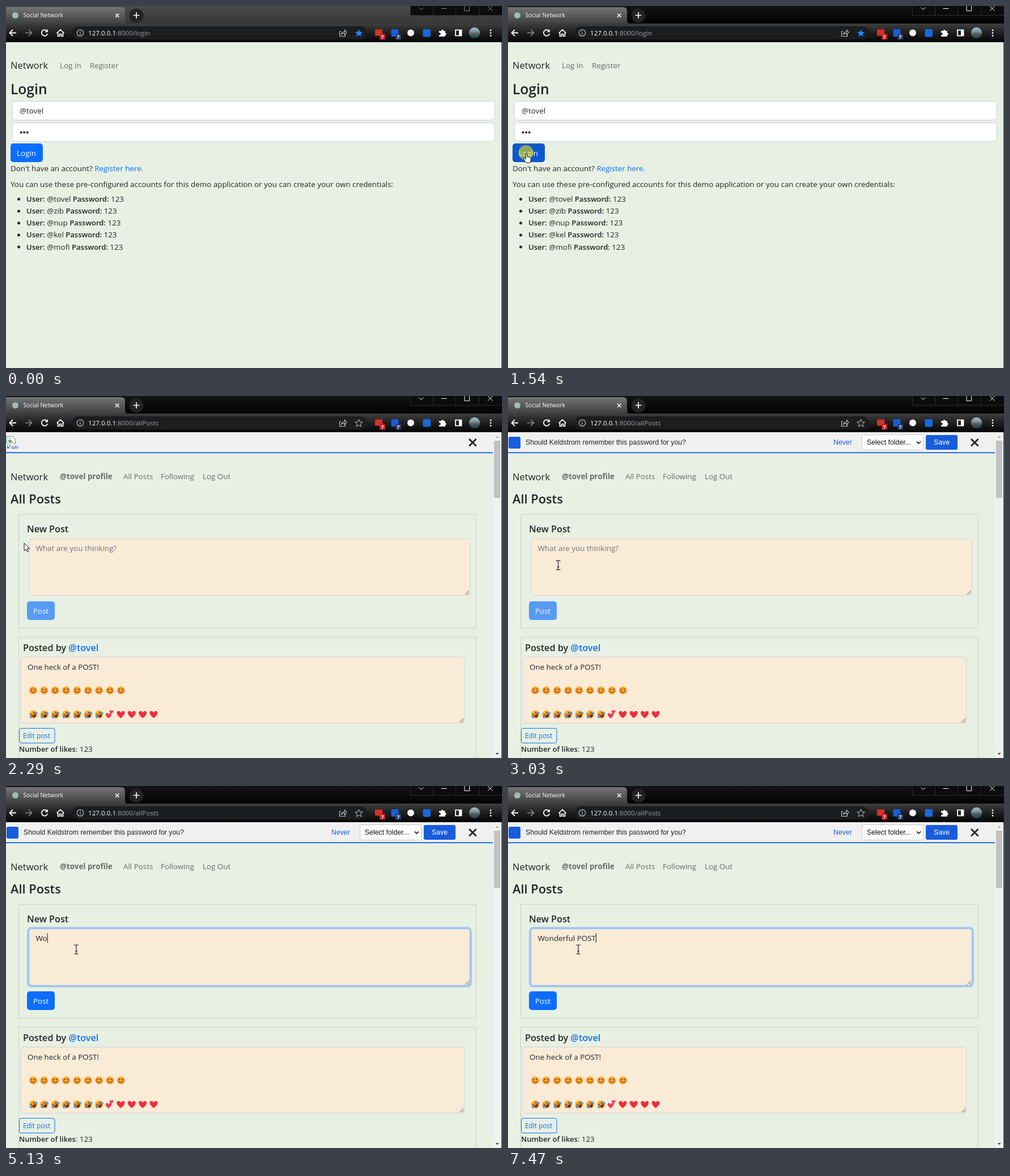
Recreate the animation shown at these times as an HTML page. Size 875 by 640 pixels, loop 8 s.

```html
<!DOCTYPE html>
<html lang="en">
<head>
<meta charset="utf-8">
<title>Social Network</title>
<style>
  html, body { margin: 0; width: 100%; height: 100%; overflow: hidden; background: #e7f0e2; }
  svg { display: block; width: 875px; height: 640px; }
  text { font-family: "Open Sans", "Noto Sans", sans-serif; white-space: pre; }
  .arial { font-family: "Liberation Sans", Arial, sans-serif; }
  .bold { font-weight: 700; }
  .semi { font-weight: 600; }
</style>
</head>
<body>
<svg id="stage" viewBox="0 0 875 640"></svg>
<script>
const LOOP = 8000;
const BLUE = '#0d6efd', INK = '#212529', BAR_BLUE = '#175ddc', MUTED = '#686c66';
const BODY = 13.38, STRONG = 13;
const USER = '@tovel';

const text = (x, y, size, content, fill = INK, cls = '') =>
  `<text x="${x}" y="${y}" font-size="${size}" fill="${fill}" class="${cls}">${content}</text>`;
const rect = (x, y, w, h, fill, r = 0, more = '') =>
  `<rect x="${x}" y="${y}" width="${w}" height="${h}" rx="${r}" fill="${fill}" ${more}/>`;
const circle = (x, y, r, fill, more = '') =>
  `<circle cx="${x}" cy="${y}" r="${r}" fill="${fill}" ${more}/>`;
const line = (d, color, width = 1, more = '') =>
  `<path d="${d}" fill="none" stroke="${color}" stroke-width="${width}" ${more}/>`;
const group = (id, content, more = '') => `<g id="${id}" ${more}>${content}</g>`;
const strong = s => `<tspan class="semi" font-size="${STRONG}">${s}</tspan>`;
const blue = s => `<tspan fill="${BLUE}">${s}</tspan>`;
const many = (n, make) => Array.from({ length: n }, (_, i) => make(i)).join('');
const field = (x, y, w, h, fill, more = '') => rect(x, y, w, h, fill, 5, `stroke="#ced4da" ${more}`);
const grip = (x, y) => line(`M${x - 7} ${y}l7 -7M${x - 3} ${y}l3 -3`, '#555', 1);

const gradient = (id, ...stops) =>
  `<linearGradient id="${id}" x2="0" y2="1">${stops.map(([at, c]) =>
    `<stop offset="${at}" stop-color="${c}"/>`).join('')}</linearGradient>`;

const defs = `<defs>
  ${gradient('idleStrip', [0, '#4b4b4b'], [1, '#363636'])}
  ${gradient('activeStrip', [0, '#141414'], [1, '#020202'])}
  ${gradient('tabFill', [0, '#757575'], [1, '#3d3d3d'])}
  ${gradient('toolFill', [0, '#3e3e3e'], [.55, '#1c1c1c'], [1, '#050505'])}
  ${gradient('photo', [0, '#a9bfca'], [.4, '#7692a2'], [.5, '#806b50'], [.65, '#39606c'], [1, '#24414b'])}
  <clipPath id="altClip"><rect x="1" y="86" width="21" height="7"/></clipPath>
</defs>`;

// Login page
const accounts = [USER, '@zib', '@nup', '@kel', '@mofi'];
const loginPage = group('login',
  text(8, 111, 16.6, 'Network') +
  text(95, 110, BODY, 'Log In', MUTED) + text(148, 110, BODY, 'Register', MUTED) +
  text(8, 155.5, 24.6, 'Login', INK, 'semi') +
  field(11.5, 168.5, 850.5, 33, '#fff') + text(24, 190, BODY, USER) +
  field(11.5, 206.5, 850.5, 33, '#fff') + many(3, i => circle(26.5 + 5.6 * i, 223.5, 2, INK)) +
  rect(8, 243, 57, 33, BLUE, 5, 'id="loginButton"') + text(19, 265, BODY, 'Login', '#fff') +
  text(8, 292, BODY, `Don't have an account? ${blue('Register here.')}`) +
  text(8, 319.5, BODY, 'You can use these pre-configured accounts for this demo application or you can create your own credentials:') +
  accounts.map((name, i) => {
    const y = 346 + 21.15 * i;
    return circle(22.5, y - 4.5, 2.5, INK) +
      text(36, y, BODY, `${strong('User:')} ${name} ${strong('Password:')} 123`);
  }).join(''));

// Emoji
const face = '<circle r="7" fill="#fbab2c"/>';
const smile = (x, y) => `<g transform="translate(${x} ${y})">${face}` +
  circle(-4.2, 1.2, 1.7, '#f2654a') + circle(4.2, 1.2, 1.7, '#f2654a') +
  line('M-4.3 -1.3q1.5 -2.6 3 0M1.3 -1.3q1.5 -2.6 3 0M-3.4 2q3.4 4 6.8 0', '#5d341c', 1.1) + '</g>';
const rofl = (x, y) => `<g transform="translate(${x} ${y}) rotate(-35)">${face}` +
  '<path d="M-4 1h8q-.6 5 -4 5t-4 -5z" fill="#7a2d22"/>' +
  line('M-4.2 -3l2.7 1.4l-2.7 1.2M4.2 -3l-2.7 1.4l2.7 1.2', '#5d341c', 1) +
  '<ellipse cx="-5.8" cy="1.2" rx="2" ry="2.3" fill="#3d9ee8"/><ellipse cx="5.8" cy="1.2" rx="2" ry="2.3" fill="#3d9ee8"/></g>';
const heart = (x, y, s = 1, color = '#ee2f3c') =>
  `<path transform="translate(${x} ${y}) scale(${s})" fill="${color}" d="M0 6.5C-9 0 -8 -6 -4 -6Q-1 -6 0 -3Q1 -6 4 -6C8 -6 9 0 0 6.5z"/>`;

// Feed page
const feedPage = group('feed',
  text(8, 148.5, 16.6, 'Network') +
  text(95, 147, BODY, `${USER} profile`, MUTED, 'bold') + text(207, 147, BODY, 'All Posts', MUTED) +
  text(273, 147, BODY, 'Following', MUTED) + text(347, 147, BODY, 'Log Out', MUTED) +
  text(8, 190, 21.8, 'All Posts', INK, 'semi') +
  rect(22.5, 209.5, 806.5, 201, 'none', 0, 'stroke="#cbd3c7"') +
  text(37, 241, 16.2, 'New Post', INK, 'semi') +
  rect(38.7, 250.7, 781.6, 103.6, 'none', 6.5, 'id="glow" stroke="#a9cbf0" stroke-width="3.6"') +
  field(40.5, 252.5, 778, 100, '#faebd7', 'id="composer"') + grip(817, 351) +
  text(52.5, 274, BODY, '', INK, 'draft') +
  line('M0 260V277', '#111', 1, 'id="caret"') +
  group('postButton', rect(37, 363, 49, 33, BLUE, 5) + text(48, 385, BODY, 'Post', '#fff')) +
  rect(22.5, 426.5, 806.5, 230, 'none', 0, 'stroke="#cbd3c7"') +
  text(30, 451, 16.2, `Posted by ${blue(USER)}`, INK, 'semi') +
  field(26.5, 461.5, 782, 117, '#faebd7') + grip(807, 577) +
  text(38, 483.5, BODY, 'One heck of a POST!') +
  many(9, i => smile(48 + 19.35 * i, 520.5)) + many(7, i => rofl(48 + 19.35 * i, 563)) +
  heart(181, 565, .75, '#ef3d55') + heart(186, 558.5, .5, '#ef3d55') +
  many(4, i => heart(202.5 + 19.35 * i, 563)) +
  rect(23.5, 587.5, 62.5, 26, 'none', 3.5, `stroke="${BLUE}"`) + text(30, 605, 11.8, 'Edit post', BLUE) +
  text(23, 629, BODY, `${strong('Number of likes')}: 123`) +
  rect(859, 64, 15, 576, '#f1f1f1') + rect(861, 79, 11, 101, '#c1c1c1') +
  '<path d="M863.5 74l3 -3.5l3 3.5z" fill="#b9a5a5"/><path d="M863.5 631l3 3.5l3 -3.5z" fill="#505050"/>');

// Password bar
const bar = group('bar',
  rect(0, 64, 875, 36, '#f0f0f0', 0, 'class="barFill"') + rect(0, 99.3, 875, 1.8, BAR_BLUE, 0, 'class="barFill"') +
  group('barText',
    rect(1, 72, 21, 21, BAR_BLUE, 3) +
    text(31, 86, 12.3, 'Should Keldstrom remember this password for you?', '#222', 'arial') +
    group('barButtons',
      text(589, 86, 12.3, 'Never', BAR_BLUE, 'arial') +
      rect(639.5, 68.5, 108, 27, '#fff', 2, 'stroke="#ccc"') + text(648, 86, 12.3, 'Select folder...', '#111', 'arial') +
      line('M736 80.5l3.5 3.5l3.5 -3.5', '#111', 1.7) +
      rect(752, 69, 56, 26, BAR_BLUE, 3) + text(766, 86, 12.3, 'Save', '#fff', 'arial'))) +
  group('barBroken',
    '<path d="M1.5 71.5h10l5 5v8l-5 -3l-5 4l-5 -2z" fill="#fff" stroke="#888"/>' +
    '<path d="M3 80q4 -5 8 0l-4 3z" fill="#57a845"/>' + circle(6, 75.5, 2, '#a8c8f0') +
    `<g clip-path="url(#altClip)">${text(1, 96, 12.3, 'Keld', BAR_BLUE, 'arial')}</g>`) +
  line('M832 76l12.5 12.5M844.5 76l-12.5 12.5', '#2a2a2a', 3, 'id="barClose"'));

// Browser frame
const badge = (x, fill) => rect(x - 5, 49, 10, 10.5, fill, 2) + text(x - 2.4, 57.5, 8.5, '7', '#fff', 'bold');
const STAR = 'M622.5 41.2l1.9 4.5l4.9 .4l-3.7 3.2l1.1 4.8l-4.2 -2.6l-4.2 2.6l1.1 -4.8l-3.7 -3.2l4.9 -.4z';
const chrome =
  rect(0, 0, 875, 32, 'url(#idleStrip)', 0, 'id="strip"') +
  '<path d="M0 32V2H203Q210 2 210 9V25Q210 32 217 32z" fill="url(#tabFill)"/>' +
  group('favicon', circle(16.5, 16.5, 5.5, '#9dbdbb')) +
  line('M12 20a5.5 5.5 0 0 1 0 -8', '#4b3c78', 2, 'id="spinner"') +
  text(30.5, 20, 10.15, '', '#fff', 'tabTitle') +
  line('M193 13.5l6.5 6.5M199.5 13.5l-6.5 6.5', '#fff', 1.5) +
  circle(230, 17, 12.5, '#232323') + line('M224.5 16.5h11M230 11v11', '#fff', 1.7) +
  rect(713, 0, 162, 17, '#0c0c0c') + line('M713.5 0V16.5H875M753.5 0v16.5M793.5 0v16.5M834.5 0v16.5', '#2c2c2c') +
  group('controls', line('M728.5 2.5l4 4l4 -4M767.5 4.5h10M809 0V8.5H817.5V0M850 0l8.5 8.5M858.5 0l-8.5 8.5', 'currentColor')) +
  rect(0, 31, 875, 33, 'url(#toolFill)') + rect(117, 36, 520, 23, '#1c1d1f', 11.5) +
  line('M18 47.5H7M12 42l-5.5 5.5l5.5 5.5', '#fff', 1.8) + line('M34 47.5H45M40 42l5.5 5.5l-5.5 5.5', '#8b8b8b', 1.6) +
  group('reload', line('M72.3 44.2A5.3 5.3 0 1 0 73.2 49', '#fff', 1.8) + '<path d="M73.8 41v5.3h-5.3z" fill="#fff"/>') +
  line('M63.5 43l9 9M72.5 43l-9 9', '#fff', 1.7, 'id="stop"') +
  line('M89.5 48l6.5 -6l6.5 6M91.5 47v6.5h3v-4h3v4h3v-6.5', '#fff', 1.7) +
  circle(131, 47.5, 5.7, 'none', 'stroke="#b9bcc0" stroke-width="1.2"') + line('M131 46.7v4M131 44v1.4', '#b9bcc0', 1.3) +
  text(145, 52, 11.6, '<tspan fill="#fff">127.0.0.1</tspan>:8000/<tspan id="path"></tspan>', '#9aa0a6') +
  line('M591 45h-2.5v8.5h10v-3M591.5 50q1 -4.5 6 -4.5v-3l3.5 4l-3.5 4v-2.5q-4 0 -6 2z', '#c4c7ca', 1.1) +
  `<path id="star" d="${STAR}"/>` +
  rect(651, 41.5, 13, 11, '#d93025', 1) + badge(664, '#cc1f2d') +
  rect(679.5, 41, 13, 13, BAR_BLUE, 2) + group('vaultBadge', badge(692, '#28406b')) +
  circle(714, 47.5, 6, '#f2f2f2') + rect(735.5, 41, 13.5, 13.5, '#1769e0', 2) +
  '<path d="M764 44h3.7a2 2 0 1 1 4 0h3v3.5a2 2 0 1 1 0 4v2.5h-10.7v-3a2 2 0 1 0 0 -3.6z" fill="#fff"/>' +
  rect(793, 42.5, 10.5, 10, 'none', 0, 'stroke="#fff" stroke-width="1.8"') + rect(799, 42, 5, 11, '#fff') +
  circle(826.5, 47.5, 9.7, 'url(#photo)') + many(3, i => circle(855, 43 + 4.7 * i, 1.4, '#fff')) +
  rect(874, 64, 1, 576, '#333');

// Each pointer has its hot spot at the origin.
const pointers =
  circle(0, 0, 13, '#ffee00', 'id="click" opacity=".55"') +
  group('pointer',
    '<path id="arrow" d="M0 0V13.5L3.2 10.6L5.3 15.3L7.6 14.3L5.5 9.7H9.7z" fill="#fff" stroke="#111"/>' +
    '<path id="hand" d="M-1.3 1q1.3 -2 2.6 0V7l1.8 -.5l1.7 .8l1.6 .2l1.3 1.2V13l-1.6 4H-1L-5.5 10.5q0 -2.2 2 -1.2l2.2 1.7z" fill="#fff" stroke="#111"/>' +
    line('M-4 -8H-1L0 -7L1 -8H4M0 -7V7M-4 8H-1L0 7L1 8H4M-2 3H2', '#222', 1.2, 'id="beam"'));

const stage = document.getElementById('stage');
stage.innerHTML = defs + rect(0, 0, 875, 640, '#e7f0e2') + loginPage + feedPage + bar + chrome + pointers;

const $ = id => document.getElementById(id);
const draft = stage.querySelector('.draft'), tabTitle = stage.querySelector('.tabTitle');
const barFills = stage.querySelectorAll('.barFill');
const show = (id, on) => $(id).style.display = on ? '' : 'none';
const set = (id, name, value) => $(id).setAttribute(name, value);
const shift = (id, x, y) => set(id, 'transform', `translate(${x} ${y})`);
const during = (t, from, to) => t >= from && t < to;
const ramp = (t, from, to) => Math.min(1, Math.max(0, (t - from) / (to - from)));
const mix = (a, b, k) => a + (b - a) * k;

const message = 'Wonderful POST';
const keyTimes = [4930, 5130, 5330, 5400, 5600, 5730, 5990, 6190, 6390, 6590, 6850, 7050, 7250, 7470];

// time, x, y, shape; an empty shape hides the pointer
const route = [
  [0, 0, 0, ''], [400, 692, 583, 'arrow'], [530, 150, 284, 'arrow'], [590, 0, 262, ''],
  [920, 1, 262, 'arrow'], [1000, 12, 261, 'hand'], [1270, 33, 260, 'hand'], [2010, 32, 260, 'arrow'],
  [2360, 32, 260, 'arrow'], [2430, 42, 267, 'beam'], [2690, 43, 267, 'beam'], [2900, 68, 290, 'beam'],
  [3130, 104, 306, 'beam'], [3270, 120, 301, 'beam'], [3440, 124, 289, 'beam'], [LOOP, 124, 289, 'beam']
];

function drawPointer(t) {
  const i = route.findIndex(stop => stop[0] > t) - 1;
  const [from, x0, y0, shape] = route[i], [to, x1, y1] = route[i + 1];
  const k = ramp(t, from, to), x = mix(x0, x1, k), y = mix(y0, y1, k);
  for (const id of ['arrow', 'hand', 'beam']) show(id, id === shape);
  shift('pointer', x, y);
  shift('click', x - 1, y - 1);
  show('click', during(t, 1470, 1940) || during(t, 3530, 3670));
}

function drawChrome(t) {
  const active = t >= 1410, loading = during(t, 1940, 2290), moved = t >= 2010;
  const connecting = during(t, 2010, 2290);
  set('strip', 'fill', active ? 'url(#activeStrip)' : 'url(#idleStrip)');
  $('controls').style.color = active ? '#fff' : '#8a8a8a';
  show('reload', !loading);
  show('stop', loading);
  show('favicon', !loading);
  show('spinner', loading);
  set('spinner', 'transform', `rotate(${(t - 2220) * .5} 16.5 16.5)`);
  tabTitle.textContent = connecting ? '127.0.0.1:8000/allPosts' : 'Social Network';
  $('path').textContent = moved ? 'allPosts' : 'login';
  set('star', 'fill', moved ? 'none' : '#1a84ff');
  set('star', 'stroke', moved ? '#c4c7ca' : 'none');
  show('vaultBadge', !during(t, 2080, 2290));
}

function drawPages(t) {
  const feed = t >= 2290, drop = 37 * ramp(t, 2080, 2150);
  const hover = t < 2010 ? ramp(t, 1000, 1200) : 0;
  show('login', !feed);
  show('feed', feed);
  shift('login', 0, drop);
  set('loginButton', 'fill', `rgb(${mix(13, 10, hover)},${mix(110, 88, hover)},${mix(253, 205, hover)})`);

  const inset = feed ? -15 : 0, broken = during(t, 2290, 2360);
  show('bar', t >= 2080);
  shift('bar', 0, drop - 37);
  show('barText', !broken);
  show('barBroken', broken);
  shift('barButtons', inset, 0);
  shift('barClose', inset, 0);
  barFills.forEach(el => el.setAttribute('width', feed ? 859 : 875));
}

function drawComposer(t) {
  const count = keyTimes.filter(time => time <= t).length;
  const focus = ramp(t, 3480, 3610);
  draft.textContent = count ? message.slice(0, count) : 'What are you thinking?';
  draft.setAttribute('fill', count ? INK : '#6c757d');
  shift('caret', count ? 53 + draft.getComputedTextLength() : 52.5, 0);
  show('caret', t >= 3530 && !during(t, 4070, 4600));
  set('glow', 'opacity', focus);
  set('composer', 'stroke', focus > .5 ? '#86b7fe' : '#ced4da');
  set('postButton', 'opacity', mix(.65, 1, ramp(t, 4930, 5080)));
}

function frame() {
  const t = performance.now() % LOOP;
  drawPages(t);
  drawComposer(t);
  drawChrome(t);
  drawPointer(t);
  requestAnimationFrame(frame);
}
frame();
</script>
</body>
</html>
```
